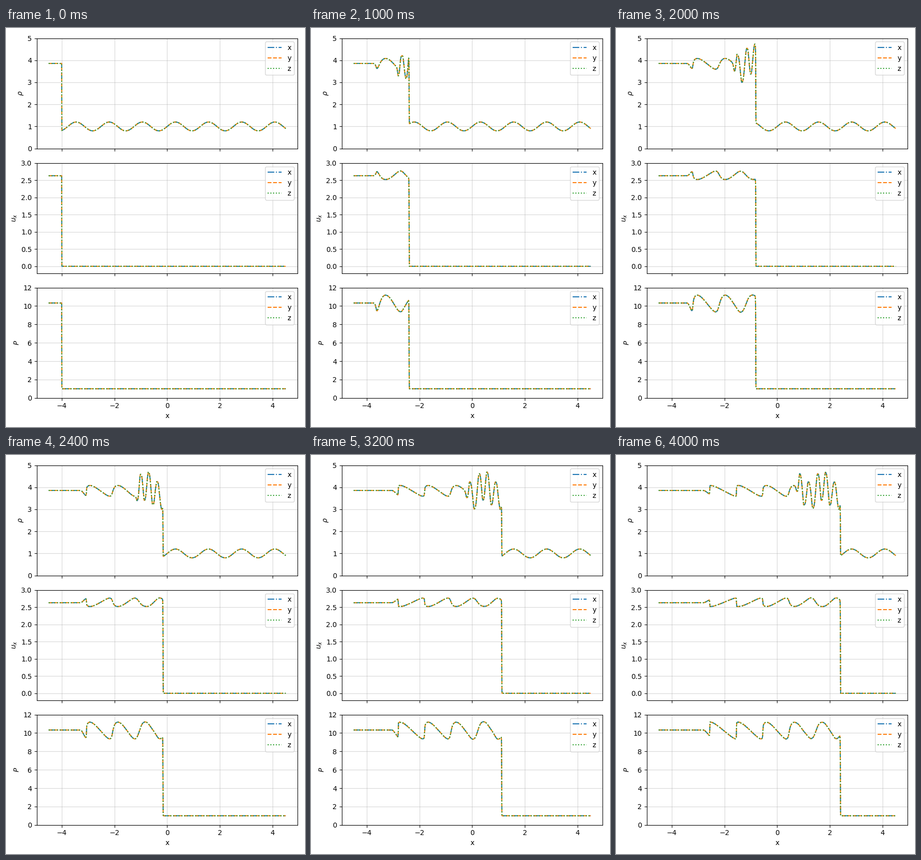
A matplotlib script that plays this animation: 600 px wide and 800 px high, repeating every 4200 ms.

```python
import numpy as np
import matplotlib.pyplot as plt
from matplotlib.animation import FuncAnimation

GAMMA = 1.4
CELLS = 1440
FRAMES = 21
FRAME_TIME = 0.09
CFL = 0.5

dx = 9 / CELLS
x = -4.5 + (np.arange(CELLS) + 0.5) * dx


def to_conserved(w):
    rho, u, p = w
    return np.array([rho, rho * u, p / (GAMMA - 1) + 0.5 * rho * u * u])


def to_primitive(q):
    rho, momentum, energy = q
    u = momentum / rho
    return np.array([rho, u, (GAMMA - 1) * (energy - 0.5 * momentum * u)])


def sound_speed(w):
    return np.sqrt(GAMMA * w[2] / w[0])


def hllc_flux(left, right):
    (rl, ul, pl), (rr, ur, pr) = left, right
    cl, cr = sound_speed(left), sound_speed(right)
    sl = np.minimum(ul - cl, ur - cr)
    sr = np.maximum(ul + cl, ur + cr)
    ml, mr = rl * (sl - ul), rr * (sr - ur)
    contact = (pr - pl + ml * ul - mr * ur) / (ml - mr)

    from_left = contact >= 0
    w = np.where(from_left, left, right)
    s = np.where(from_left, sl, sr)
    rho, u, p = w
    q = to_conserved(w)
    flux = u * q
    flux[1] += p
    flux[2] += u * p

    mass = rho * (s - u)
    star_rho = mass / (s - contact)
    star_energy = q[2] / rho + (contact - u) * (contact + p / mass)
    star = np.array([star_rho, star_rho * contact, star_rho * star_energy])
    # A supersonic side has zero weight and keeps its plain flux.
    weight = np.where(from_left, np.minimum(sl, 0), np.maximum(sr, 0))
    return flux + weight * (star - q)


def rate(q):
    w = to_primitive(np.pad(q, ((0, 0), (2, 2)), mode="edge"))
    step = np.diff(w)
    a, b = step[:, :-1], step[:, 1:]
    size = np.minimum(2 * np.minimum(abs(a), abs(b)), 0.5 * abs(a + b))
    half_slope = np.where(a * b > 0, 0.5 * np.sign(a) * size, 0)
    middle = w[:, 1:-1]
    left = (middle + half_slope)[:, :-1]
    right = (middle - half_slope)[:, 1:]
    return -np.diff(hllc_flux(left, right)) / dx


def solve():
    """Shock running into a sine density field, sampled once per frame."""
    behind = x < -4
    w = np.array([
        np.where(behind, 27 / 7, 1 + 0.2 * np.sin(5 * x)),
        np.where(behind, 2.629369, 0.0),
        np.where(behind, 31 / 3, 1.0),
    ])
    q = to_conserved(w)
    states = [w]
    for _ in range(FRAMES - 1):
        remaining = FRAME_TIME
        while remaining > 1e-12:
            w = to_primitive(q)
            fastest = np.max(abs(w[1]) + sound_speed(w))
            dt = min(CFL * dx / fastest, remaining)
            predicted = q + dt * rate(q)
            q = 0.5 * (q + predicted + dt * rate(predicted))
            remaining -= dt
        states.append(to_primitive(q))
    return states


states = solve()

fig, axes = plt.subplots(3, 1, figsize=(6, 8), dpi=100, sharex=True)
panels = [(r"$\rho$", (0, 5)), (r"$u_x$", (-0.2, 3)), (r"$P$", (0, 12))]
styles = [("x", "-."), ("y", "--"), ("z", ":")]

curves = []
for ax, (label, limits), values in zip(axes, panels, states[0]):
    curves.append([ax.plot(x, values, style, label=name)[0]
                   for name, style in styles])
    ax.set_ylabel(label)
    ax.set_ylim(*limits)
    ax.grid(alpha=0.5)
    ax.legend(loc="upper right")
axes[-1].set_xlabel("x")
fig.tight_layout()


def update(frame):
    for group, values in zip(curves, states[frame]):
        for curve in group:
            curve.set_ydata(values)
    return sum(curves, [])


animation = FuncAnimation(fig, update, frames=FRAMES, interval=200,
                          repeat=True, repeat_delay=0)
plt.show()
```
